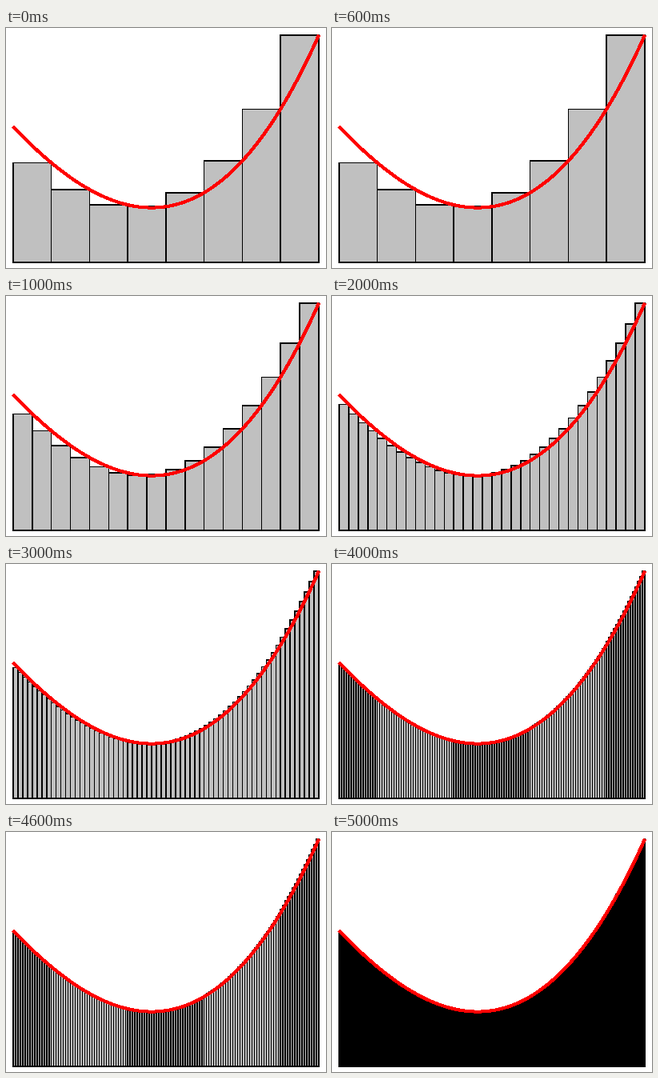
A matplotlib script for the animation above (6 s loop, 400x300 px).

```python
import numpy as np
import matplotlib.pyplot as plt
from matplotlib.animation import FuncAnimation
from matplotlib.collections import PolyCollection

W, H, DPI = 400, 300, 100
LEFT, RIGHT, BASE = 9, 391, 293
PEN = 1.5          # bar outline width in pixels
CURVE_PEN = 3      # curve width in pixels
STEPS = 6          # 8, 16, ... 256 bars

# Cubic through four heights above the base line
COEF = np.polyfit([0, 1, 3, 4], [169.5, 91, 127, 284], 3)


def curve_y(x):
    return BASE - np.polyval(COEF, 4 * (x - LEFT) / (RIGHT - LEFT))


def pen_span(v):
    """Whole pixels whose centres lie under a stroke centred on v."""
    lo = np.ceil(np.round(v - PEN / 2 - 0.5, 6))
    hi = np.ceil(np.round(v + PEN / 2 - 0.5, 6))
    return lo, hi


def box(x0, y0, x1, y1):
    return [(x0, y0), (x1, y0), (x1, y1), (x0, y1)]


def bars(n):
    """Outer and inner boxes of n bars that touch the curve on the right."""
    edges = np.linspace(LEFT, RIGHT, n + 1)
    base_lo, base_hi = pen_span(BASE)
    outer, inner = [], []
    for a, b in zip(edges[:-1], edges[1:]):
        a_lo, a_hi = pen_span(a)
        b_lo, b_hi = pen_span(b)
        top_lo, top_hi = pen_span(curve_y(b))
        outer.append(box(a_lo, top_lo, b_hi, base_hi))
        if b_lo > a_hi:
            inner.append(box(a_hi, top_hi, b_lo, base_lo))
    return outer, inner


fig = plt.figure(figsize=(W / DPI, H / DPI), dpi=DPI, facecolor="white")
ax = fig.add_axes([0, 0, 1, 1])
ax.set_xlim(0, W)
ax.set_ylim(H, 0)
ax.axis("off")


def add_boxes(color, z):
    boxes = PolyCollection([], facecolors=color, edgecolors="none",
                           linewidths=0, antialiaseds=False, zorder=z)
    boxes.set_snap(False)
    ax.add_collection(boxes, autolim=False)
    return boxes


outlines = add_boxes("black", 1)
fills = add_boxes("#c0c0c0", 2)

xs = np.linspace(LEFT, RIGHT, 400)
ax.plot(xs, curve_y(xs), color="red", lw=CURVE_PEN * 72 / DPI,
        antialiased=False, solid_capstyle="butt", solid_joinstyle="round",
        snap=False, zorder=3)


def update(i):
    outer, inner = bars(8 * 2 ** i)
    outlines.set_verts(outer)
    fills.set_verts(inner)
    return outlines, fills


anim = FuncAnimation(fig, update, frames=STEPS, interval=1000,
                     init_func=lambda: update(0), repeat=True, repeat_delay=0)
plt.show()
```
